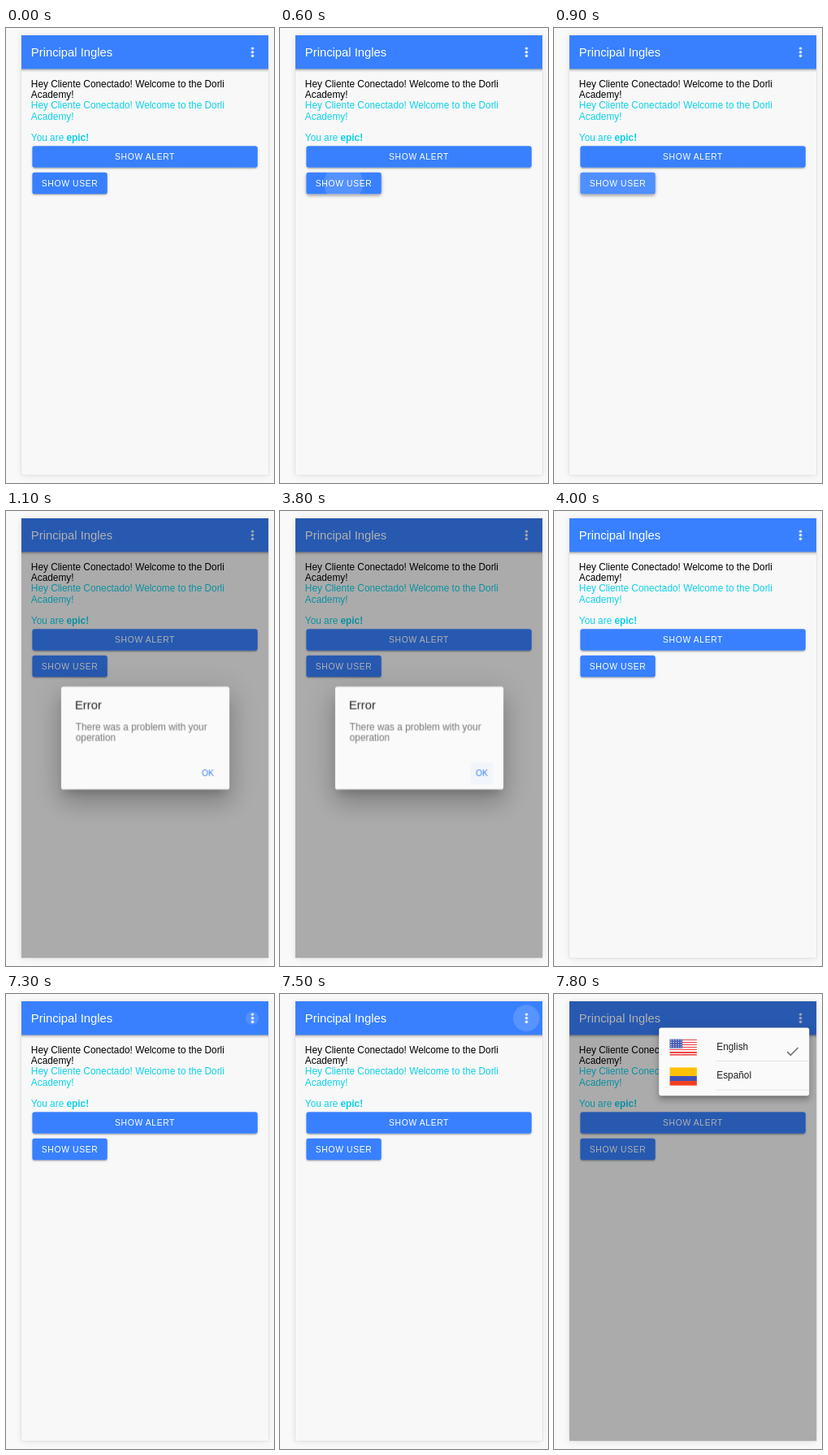
These frames come from a looping animation (330 px wide and 560 px high, 8000 ms). An HTML page:

```html
<!DOCTYPE html>
<html lang="en">
<head>
<meta charset="utf-8">
<title>Alert and language menu</title>
<style>
  :root { --blue: #3880ff; --paper: #f9f9f9; --loop: 8s step-end infinite; }
  * { box-sizing: border-box; }
  html, body { margin: 0; width: 100%; height: 100%; overflow: hidden; background: var(--paper); }
  body { position: relative; font: 16px/18px "Liberation Sans", Arial, sans-serif; }

  /* 411 x 731 device shown at 74% */
  .phone {
    position: absolute; left: 19px; top: 9px; width: 411px; height: 731px;
    transform: scale(.74); transform-origin: 0 0;
    background: #f8f8f8; color: #000;
    box-shadow: 0 0 0 1px rgba(0,0,0,.06), 0 1px 12px rgba(0,0,0,.1);
  }
  .screen { position: absolute; inset: 0; overflow: hidden; }
  .screen div, .screen svg, .screen span { position: absolute; white-space: nowrap; }

  .bar { left: 0; top: 0; width: 100%; height: 56px; background: var(--blue); color: #fff; }
  .bar::after {
    content: ""; position: absolute; left: 0; top: 56px; width: 100%; height: 6px;
    background: linear-gradient(rgba(0,0,0,.32), rgba(0,0,0,.1) 45%, transparent);
  }
  .bar .title { left: 16px; top: 16px; font-size: 20px; line-height: 24px; }
  .dots { left: 360px; top: 4px; }

  .intro { left: 16px; top: 72px; }
  .cyan { left: 16px; top: 108px; color: #0cd1e8; }

  .btn {
    left: 18px; height: 36px; border-radius: 4px; overflow: hidden;
    background: var(--blue); color: #fff; text-align: center;
    font-size: 14px; font-weight: 500; line-height: 36px; letter-spacing: .06em;
  }
  .shade {
    left: 18px; height: 36px; border-radius: 4px;
    box-shadow: 0 3px 1px -2px rgba(0,0,0,.2), 0 2px 2px rgba(0,0,0,.14), 0 1px 5px rgba(0,0,0,.12);
  }
  .wide { top: 184px; width: 375px; }
  .small { top: 228px; width: 125px; }
  .shade.small { animation: lift var(--loop); }
  .ripple { border-radius: 50%; background: #fff; opacity: 0; }
  .btn .ripple { left: -3px; top: -47px; width: 130px; height: 130px; animation: press 8s infinite; }

  .backdrop { inset: 0; background: #000; opacity: 0; animation: dim var(--loop); }

  .alert {
    left: 65.5px; top: 280px; width: 280px; height: 171px; border-radius: 4px;
    background: #fafafa; opacity: 0; animation: alert var(--loop);
    box-shadow: 0 11px 15px -7px rgba(0,0,0,.2), 0 24px 38px 3px rgba(0,0,0,.14), 0 9px 46px 8px rgba(0,0,0,.12);
  }
  .alert .head { left: 23px; top: 20px; font-size: 20px; line-height: 23px; color: #222; }
  .alert .text { left: 24px; top: 58px; color: #777; }
  .alert .ok { left: 226px; top: 126px; width: 37px; height: 36px; border-radius: 2px; }
  .ok span { left: 8px; top: 9px; font-size: 14px; font-weight: 500; color: var(--blue); }
  .ok .ripple { inset: 0; border-radius: 2px; background: var(--blue); animation: tap var(--loop); }

  .menu {
    left: 148.6px; top: 44px; width: 250px; height: 113px; border-radius: 4px;
    background: #fafafa; color: #222; opacity: 0; transform-origin: 100% 0;
    animation: menu var(--loop);
    box-shadow: 0 5px 5px -3px rgba(0,0,0,.2), 0 8px 10px 1px rgba(0,0,0,.14), 0 3px 14px 2px rgba(0,0,0,.12);
  }
  .item { left: 0; width: 100%; height: 48px; }
  .item::after {
    content: ""; position: absolute; left: 96px; right: 0; bottom: 0; height: 1px; background: #dcdcdc;
  }
  .item span { left: 96px; top: 15px; }
  .flag { left: 18px; width: 45px; }
  .us { top: 11px; height: 27px; background: repeating-linear-gradient(#ee4444 0 7.692%, #fafafa 0 15.385%); }
  .us i {
    position: absolute; left: 0; top: 0; width: 21px; height: 14.6px;
    background: radial-gradient(circle, #fff 0 .8px, transparent 1.2px) 0 0 / 4.2px 3.65px, #4258b0;
  }
  .co { top: 10px; height: 30px; background: linear-gradient(#ffc107 50%, #3f51b5 0 75%, #f5401f 0); }
  .tick { left: 212px; top: 22px; }

  .glow { animation: glow 8s infinite; transform-origin: 24px 24px; opacity: 0; }

  @keyframes press {
    0% { opacity: 0; transform: scale(.2); animation-timing-function: step-end; }
    6.25% { opacity: .14; transform: scale(.25); animation-timing-function: steps(3, end); }
    10% { opacity: .16; transform: scale(1); animation-timing-function: step-end; }
    11.25% { opacity: .12; transform: scale(1); animation-timing-function: step-end; }
    12.5% { opacity: .05; transform: scale(1); animation-timing-function: step-end; }
    13.75%, 100% { opacity: 0; transform: scale(1); }
  }
  @keyframes lift {
    0%, 13.75%, 100% {
      box-shadow: 0 3px 1px -2px rgba(0,0,0,.2), 0 2px 2px rgba(0,0,0,.14), 0 1px 5px rgba(0,0,0,.12);
    }
    6.25% {
      box-shadow: 0 3px 5px -1px rgba(0,0,0,.2), 0 3px 5px rgba(0,0,0,.14), 0 1px 8px rgba(0,0,0,.12);
    }
  }
  @keyframes dim {
    0%, 50%, 93.75% { opacity: 0; }
    12.5% { opacity: .2; }
    13.75% { opacity: .31; }
    48.75% { opacity: .13; }
    95% { opacity: .21; }
    96.25% { opacity: .29; }
    97.5%, 100% { opacity: .31; }
  }
  @keyframes alert {
    0% { opacity: 0; transform: scale(.9); }
    11.25% { opacity: .01; transform: scale(.9); }
    12.5% { opacity: .7; transform: scale(.97); }
    13.75% { opacity: 1; transform: none; }
    48.75% { opacity: .4; transform: none; }
    50%, 100% { opacity: 0; transform: none; }
  }
  @keyframes tap {
    0%, 50%, 100% { opacity: 0; }
    47.5% { opacity: .04; }
    48.75% { opacity: .1; }
  }
  @keyframes glow {
    0% { opacity: 0; transform: scale(.5); animation-timing-function: step-end; }
    91.25% { opacity: .13; transform: scale(.5); animation-timing-function: steps(2, end); }
    93.75% { opacity: .16; transform: scale(1); animation-timing-function: step-end; }
    95% { opacity: .08; transform: scale(1); animation-timing-function: step-end; }
    96.25%, 100% { opacity: 0; transform: scale(1); }
  }
  @keyframes menu {
    0% { opacity: 0; transform: scale(.001); }
    95% { opacity: .7; transform: scale(.76); }
    96.25% { opacity: .95; transform: scale(.97); }
    97.5%, 100% { opacity: 1; transform: none; }
  }
</style>
</head>
<body>
<div class="phone"><div class="screen">
  <div class="bar">
    <div class="title">Principal Ingles</div>
    <svg class="dots" width="48" height="48" fill="#fff">
      <circle class="glow" cx="24" cy="24" r="22"/>
      <circle cx="24.5" cy="17.8" r="2.2"/>
      <circle cx="24.5" cy="24" r="2.2"/>
      <circle cx="24.5" cy="30.2" r="2.2"/>
    </svg>
  </div>

  <div class="intro">Hey Cliente Conectado! Welcome to the Dorli<br>Academy!</div>
  <div class="cyan">Hey Cliente Conectado! Welcome to the Dorli<br>Academy!<br><br>You are <b>epic!</b></div>

  <div class="shade wide"></div>
  <div class="btn wide">SHOW ALERT</div>
  <div class="shade small"></div>
  <div class="btn small">SHOW USER<span class="ripple"></span></div>

  <div class="backdrop"></div>

  <div class="alert">
    <div class="head">Error</div>
    <div class="text">There was a problem with your<br>operation</div>
    <div class="ok"><div class="ripple"></div><span>OK</span></div>
  </div>

  <div class="menu">
    <div class="item" style="top:8px">
      <div class="flag us"><i></i></div>
      <span>English</span>
      <svg class="tick" width="22" height="20" fill="none" stroke="#737373" stroke-width="2.2">
        <path d="M1.5 10 L7 15.500 L19.500 3"/>
      </svg>
    </div>
    <div class="item" style="top:56px">
      <div class="flag co"></div>
      <span>Español</span>
    </div>
  </div>
</div></div>
</body>
</html>
```
